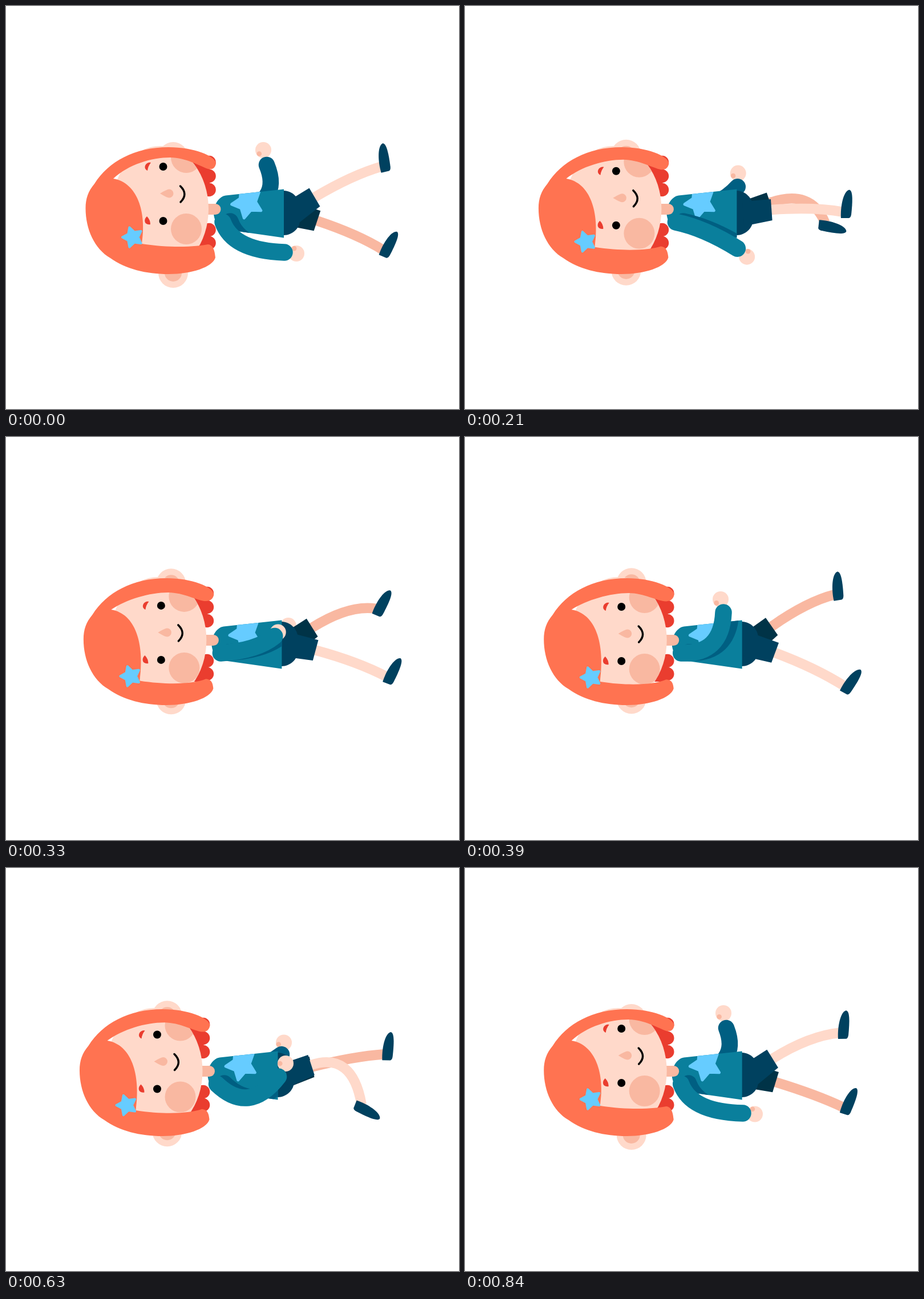
An HTML page with a canvas that plays this animation: 794 px wide and 705 px high, repeating every 870 ms.

```html
<!DOCTYPE html>
<html lang="en">
<head>
<meta charset="utf-8">
<title>Walking girl</title>
<style>
  html, body { margin: 0; height: 100%; overflow: hidden; background: #fff; }
  canvas { display: block; }
</style>
</head>
<body>
<canvas id="stage" width="794" height="705"></canvas>
<script>
const ctx = document.getElementById('stage').getContext('2d');
const LOOP = 870, STEP = 30, RAD = Math.PI / 180;
const skin = '#ffd9ca', blush = '#f9b8a1', hair = '#ff7351', hairDark = '#ea3d2f';
const teal = '#0a7f9c', tealDark = '#005f82', navy = '#00415f', navyDark = '#003347';
const blue = '#66ccff', black = '#000';

// Key poses: time, then values
const bob = [[0, 0], [120, -6.5], [200, -10.8], [270, -6.3], [390, -1.3], [430, 0],
  [510, -4.3], [630, -10.5], [840, -1.3]];
const turn = [[0, 0], [120, 3], [270, 11], [390, 16], [510, 16], [630, 10.5], [840, 0]];
// Legs: thigh angle, heel x, heel y, shoe angle
const nearLeg = [
  [0, -30.7, 665.5, 290, -5], [120, -19, 677.5, 319.5, -8], [270, 6, 675.3, 405.5, 21],
  [390, 20.4, 665.3, 447.5, 37], [510, 10.7, 647.8, 444.5, 57], [630, -18, 622, 414, 120],
  [720, -28, 648, 358, 78], [840, -32, 663.3, 299, 8]];
const farLeg = [
  [0, 18.4, 661, 438.5, 30], [120, 1.5, 636.5, 418.5, 81], [195, -16, 628, 390, 108],
  [270, -27, 647.3, 347.5, 69.5], [390, -35, 655.8, 285.5, -1], [510, -32, 663.8, 290.5, -5],
  [630, -14, 678, 336.5, 9], [840, 17, 665.8, 430.5, 26]];
// Arms: elbow, cuff and hand points
const nearArm = [
  [0, 398, 428, 488, 431, 509, 433], [120, 420, 415, 473.5, 449, 487.5, 464],
  [270, 436, 374, 493, 396, 509.3, 405], [390, 451, 381, 454.3, 307, 449.3, 284],
  [510, 463, 400, 463.3, 317, 458.3, 293], [630, 436.5, 432, 488, 365, 500.5, 342],
  [840, 398, 427, 488.3, 429, 509.3, 430.5]];
const farArm = [
  [0, 485, 345, 457, 278, 451, 252], [120, 467, 340, 473.5, 294, 475.5, 269],
  [270, 450, 360, 495, 331, 496, 310], [390, 440, 370, 487, 352, 499, 345],
  [510, 440, 370, 487, 347, 500, 336], [630, 455, 355, 493.5, 326, 497.5, 305.5],
  [840, 485, 345, 459.3, 280, 454.3, 254]];

// Smooth periodic interpolation through the key poses
function sample(keys, t) {
  const n = keys.length;
  const key = i => {
    const k = keys[(i + n) % n];
    return [k[0] + LOOP * Math.floor(i / n), ...k.slice(1)];
  };
  let i = n - 1;
  while (keys[i][0] > t) i--;
  const [a, b, c, d] = [key(i - 1), key(i), key(i + 1), key(i + 2)];
  const span = c[0] - b[0], u = (t - b[0]) / span, v = 1 - u;
  return b.slice(1).map((p, j) => {
    const q = c[j + 1];
    const m0 = (q - a[j + 1]) / (c[0] - a[0]) * span;
    const m1 = (d[j + 1] - p) / (d[0] - b[0]) * span;
    return p * (1 + 2 * u) * v * v + m0 * u * v * v + q * u * u * (3 - 2 * u) - m1 * u * u * v;
  });
}

function fill(d, color) {
  ctx.fillStyle = color;
  ctx.fill(new Path2D(d));
}

function line(d, color, width, cap = 'round') {
  ctx.strokeStyle = color;
  ctx.lineWidth = width;
  ctx.lineCap = cap;
  ctx.lineJoin = 'round';
  ctx.stroke(new Path2D(d));
}

function dot(x, y, r, color) {
  ctx.fillStyle = color;
  ctx.beginPath();
  ctx.arc(x, y, r, 0, 7);
  ctx.fill();
}

function placed(x, y, degrees, draw) {
  ctx.save();
  ctx.translate(x, y);
  ctx.rotate(degrees * RAD);
  draw();
  ctx.restore();
}

function clipped(path, draw) {
  ctx.save();
  ctx.clip(path);
  draw();
  ctx.restore();
}

function star(x, y, r, degrees, round) {
  placed(x, y, degrees, () => {
    let d = '';
    for (let i = 0; i < 10; i++) {
      const a = (180 + i * 36) * RAD, len = i % 2 ? r * 0.53 : r;
      d += (i ? 'L' : 'M') + len * Math.cos(a) + ' ' + len * Math.sin(a);
    }
    fill(d + 'Z', blue);
    line(d + 'Z', blue, round);
  });
}

function leg([thigh, x, y, foot], color, cloth) {
  const hipX = 498, hipY = 360;
  const along = r => `${hipX + r * Math.cos(thigh * RAD)} ${hipY + r * Math.sin(thigh * RAD)}`;
  const c = Math.cos(foot * RAD), s = Math.sin(foot * RAD);
  const ankle = `${x - 6 * c + 10 * s} ${y - 6 * s - 10 * c}`;
  line(`M${along(30)}L${along(50)}Q${along(126)} ${ankle}`, color, 17.5, 'butt');
  placed(hipX, hipY, thigh, () => fill('M0-18L50-18.5V18.5L0 25Z', cloth));
  placed(x, y, foot, () =>
    fill('M-8 1C-12-18-11-46-1-50C6-50 8-30 9-8Q9-2 6-1Z', navy));
}

function hand(cuffX, cuffY, x, y) {
  const a = Math.atan2(y - cuffY, x - cuffX) - 119 * RAD;
  dot(x, y, 14, skin);
  dot(x + 9.7 * Math.cos(a), y + 9.7 * Math.sin(a), 4.3, blush);
}

const torso = 'M385 331.5L487 320.5V405.5L385 391C372 389 364 375 364 361C364 347 374 333 385 331.5Z';
const torsoPath = new Path2D(torso);
const facePath = new Path2D();
facePath.ellipse(270, 355, 85, 110, 0, 0, 7);

function drawBody(t) {
  const [fx, fy, ...farHand] = sample(farArm, t);
  hand(...farHand);
  line(`M400 360Q${fx} ${fy} ${farHand[0]} ${farHand[1]}`, tealDark, 28.5);

  leg(sample(farLeg, t), blush, navyDark);
  fill('M480 323H487C502 323 515 337 515 350V376C515 388 502 401 487 401H480Z', navy);
  leg(sample(nearLeg, t), skin, navy);

  const [nx, ny, ...nearHand] = sample(nearArm, t);
  const sleeve = `M380 378Q${nx} ${ny} ${nearHand[0]} ${nearHand[1]}`;
  fill(torso, teal);
  clipped(torsoPath, () => {
    star(423, 344, 27.5, -6, 5);
    ctx.translate(13, -1);
    line(sleeve, tealDark, 29.5);
  });
  hand(...nearHand);
  line(sleeve, teal, 29.5);
  line('M345 355.5H367', blush, 19);
}

function drawHead(q) {
  for (const y of [264, 467]) {
    dot(293, y - q * 0.55, 26, skin);
    dot(293, y - q * 0.55, 15, blush);
  }
  fill('M300 268H357V333H300ZM300 380H357V428H300Z', hairDark);
  for (const y of [273.5, 297.5, 321.5, 391.5, 414.5]) dot(356, y, 11.8, hairDark);

  ctx.fillStyle = skin;
  ctx.fill(facePath);
  clipped(facePath, () => {
    ctx.translate(0, q);
    dot(316, 265, 27, blush);
    dot(316, 390, 27, blush);
  });

  placed(0, q, 0, () => {
    dot(275.5, 281, 7, black);
    dot(275.5, 376, 7, black);
    fill('M254 274C245 272 239 284 248 288Q249 280 254 274Z', hairDark);
    fill('M247 368C240 374 243 384 253 382Q253 374 247 368Z', hairDark);
    fill('M270 328Q282 320.5 286 320.5A7.5 7.5 0 0 1 286 335.5Q282 335.5 270 328Z', blush);
    line('M305.5 315Q320 329 306 343', black, 3.5);
  });

  const a = q * 0.5, b = q * 0.75;
  fill(`M368 275C366 262 330 247 285 247C225 247 180 272 155 311
    C144 324 139.5 337 139.5 354C139.5 390 155 425 183 441C210 460 245 469 285 469
    C325 469 362 457 367 440C366 430 364 ${418 + b * 0.6} 354 ${417 + b * 0.6}
    C335 ${421 + b} 290 ${424 + b} 238 ${416 + b}C247 360 230 309 188 302
    C215 ${277 + a} 255 ${265 + a} 288 ${265 + a}
    C315 ${265 + a} 340 ${280 + a} 354 ${285 + a * 0.3}C362 287 367 283 368 275Z`, hair);
  star(222, 404.5 + q, 18, 0, 4);
}

function frame(now) {
  const t = Math.floor(now / STEP) * STEP % LOOP;
  ctx.clearRect(0, 0, 794, 705);
  placed(sample(bob, t)[0], 0, 0, () => {
    drawBody(t);
    drawHead(sample(turn, t)[0]);
  });
  requestAnimationFrame(() => frame(performance.now() - start));
}

const start = performance.now();
frame(0);
</script>
</body>
</html>
```
